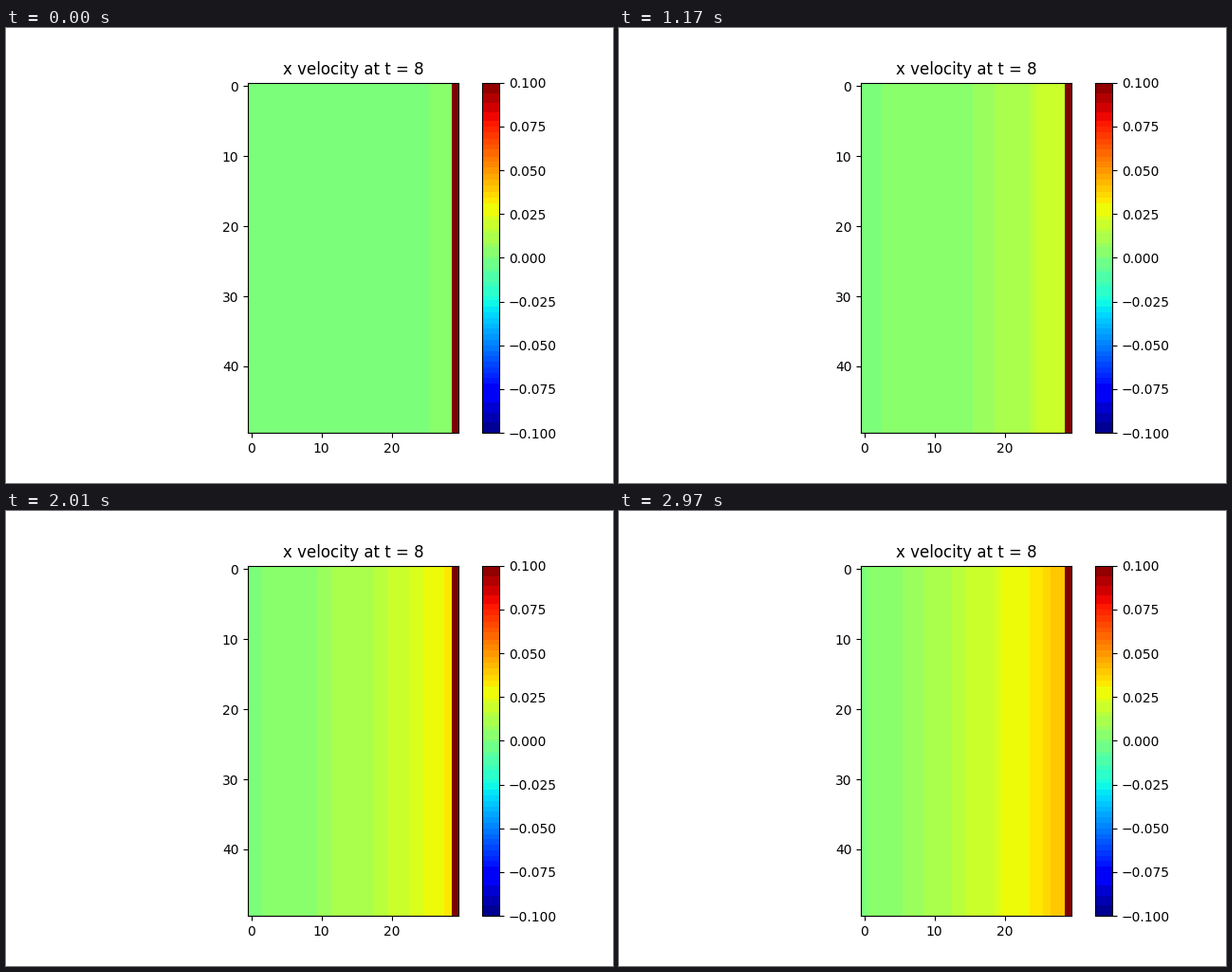
A matplotlib script for the animation above (3 s loop, 640x480 px).

```python
from itertools import groupby

import matplotlib.pyplot as plt
import numpy as np
from matplotlib.animation import FuncAnimation
from matplotlib.colors import ListedColormap

FRAMES = 100
INTERVAL = 30
ROWS, COLS = 50, 30
WALL_SPEED = 0.1
SHADES = 256
UNIT = 2 * WALL_SPEED / SHADES  # speed spanned by one shade


def banded_jet():
    """Jet with neighbouring shades merged into flat bands."""
    lut = plt.get_cmap("jet", SHADES)(np.arange(SHADES))[:, :3]
    levels = (lut * 255).astype(int)

    def band(i):
        r, g, b = levels[i]
        return r >> 5, g >> 4, b >> 5

    colors = lut.copy()
    for _, group in groupby(range(SHADES), key=band):
        idx = list(group)
        colors[idx] = lut[idx].mean(axis=0)
    return ListedColormap(colors)


def velocity(n):
    """Fluid dragged by the right wall; the slope at the left wall grows steadily."""
    c = np.arange(COLS)
    slope = 0.0164 * (n - 17.7)
    bend = 8.35e-4 - 1.1e-7 * (n - 56) ** 2
    row = np.maximum(0, slope * c + bend * c**3) * UNIT
    row[-1] = WALL_SPEED
    return np.tile(row, (ROWS, 1))


fig, ax = plt.subplots(figsize=(6.4, 4.8), dpi=100)
image = ax.imshow(velocity(0), cmap=banded_jet(), vmin=-WALL_SPEED,
                  vmax=WALL_SPEED, interpolation="nearest")
fig.colorbar(image, ax=ax)
ax.set_title("x velocity at t = 8")


def update(n):
    image.set_data(velocity(n))
    return (image,)


anim = FuncAnimation(fig, update, frames=FRAMES, interval=INTERVAL,
                     repeat=True, repeat_delay=0)
plt.show()
```
